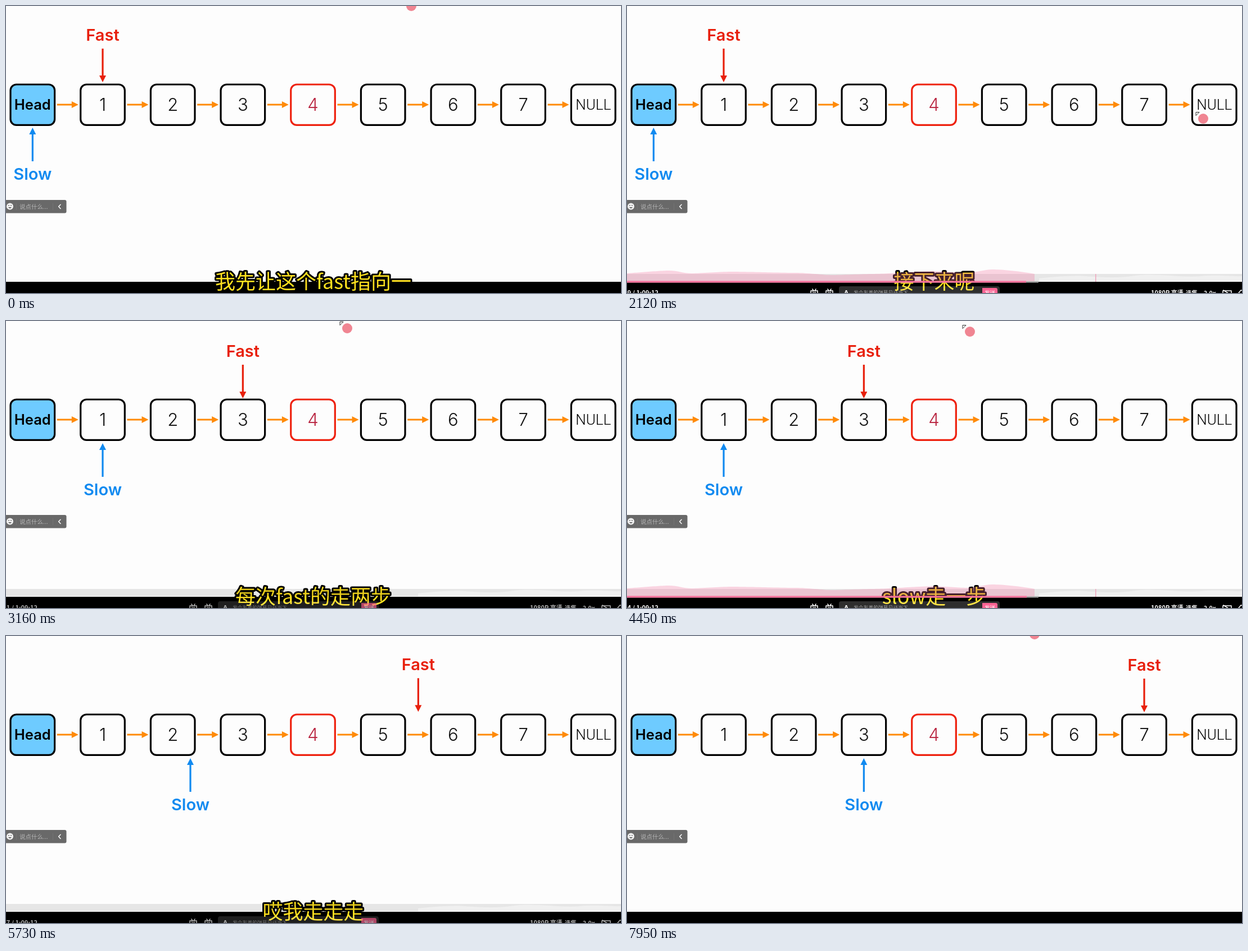
Recreate the animation shown at these times as an HTML page. Size 1094 px wide and 512 px high, loop 7990 ms.

```html
<!DOCTYPE html>
<html lang="zh">
<head>
<meta charset="utf-8">
<style>
  html, body { margin: 0; width: 100%; height: 100%; overflow: hidden; background: #fdfdfd; }
  svg { display: block; width: 100vw; height: 100vh; }
  text { font-family: Inter, "Liberation Sans", sans-serif; }
  .mid { text-anchor: middle; }
  .cjk { font-family: "Noto Sans CJK SC", "Noto Sans CJK", sans-serif; }
  .pointer { font-size: 29px; font-weight: 600; text-anchor: middle; }
  #caption { font-size: 36px; font-weight: 500; fill: #ffe11f; stroke: #000; stroke-width: 6;
    stroke-linejoin: round; paint-order: stroke; text-anchor: middle; }
  .ui { font-size: 11px; font-weight: 700; fill: #fff; }
  .line { fill: none; stroke: #fff; stroke-width: 1.5; stroke-linecap: round; stroke-linejoin: round; }
</style>
</head>
<body>
<svg viewBox="0 0 1094 512" preserveAspectRatio="none">
  <rect width="1094" height="512" fill="#fdfdfd"/>
  <g id="list"></g>

  <g id="fast" fill="#e8200c">
    <text class="pointer" y="62">Fast</text>
    <path d="M-1.6 76h3.2v48H6L0 136-6 124h4.4z"/>
  </g>
  <g id="slow" fill="#118af0">
    <text class="pointer" y="310">Slow</text>
    <path d="M-1.6 277h3.2v-48H6L0 217-6 229h4.4z"/>
  </g>

  <g id="chat">
    <rect x="-6" y="346" width="113.5" height="23.5" rx="3" fill="#696969"/>
    <circle cx="7" cy="357.5" r="6" fill="#f2f2f2"/>
    <path d="M4 359q3 4 6 0z M4.2 355h1.6v1.6H4.2z M8.2 355h1.6v1.6H8.2z" fill="#555"/>
    <path d="M18.5 352v12M83.5 352v12" stroke="#747474"/>
    <text class="cjk" x="24" y="362" font-size="10.5" fill="#b4b4b4">说点什么...</text>
    <path class="line" d="M97 354.2l-3.4 3.6 3.4 3.6"/>
  </g>

  <rect y="492" width="1094" height="20"/>
  <text id="caption" class="cjk" x="546.5" y="505"></text>

  <g id="strip">
    <rect y="478" width="1094" height="13" fill-opacity=".09"/>
    <path d="M733 491V486S780 480 815 482 870 486 905 481 985 485 1020 482 1075 483 1094 482V491z" fill="#fff" fill-opacity=".4"/>
  </g>
  <g id="progress">
    <path d="M0 491V477S60 472 75 472 100 477 115 477 165 474 185 474 280 476 300 476 350 480 365 480 420 478 440 478 530 473 545 473 590 476 605 476 635 470 650 470 700 473 725 478V491z" fill="#f0709c" fill-opacity=".29"/>
    <rect x="833" y="478" width="1.5" height="14" fill="#f0a5bd"/>
    <rect y="491" width="732" height="2.5" fill="#a8a8a8"/>
    <rect id="played" y="490.5" height="3" fill="#fb6f9b"/>
  </g>
  <g id="controls">
    <text id="clock" class="ui cjk" x="56" y="516" text-anchor="end"></text>
    <g id="danmaku"></g>
    <rect x="377" y="500" width="286" height="24" rx="4" fill="#fff" fill-opacity=".18"/>
    <text class="ui mid" x="390" y="515" font-weight="400">A</text>
    <text class="cjk" x="403" y="514.5" font-size="8.8" fill="#a5a5a5">发个友善的弹幕见证当下</text>
    <path d="M632 503h24q3 0 3 3v10h-27z" fill="#fb6494"/>
    <text class="cjk mid" x="645.5" y="514.5" font-size="9.5" fill="#fff">发送</text>
    <text class="ui cjk" x="932" y="516">1080P 高清</text>
    <text class="ui cjk" x="994" y="516" style="font-size:10.5px">选集</text>
    <text class="ui cjk" x="1026" y="516" style="font-size:10.5px">2.0x</text>
    <path class="line" d="M1060 514v-6h15v6M1061 507l14 9M1088 512l4-5 4 1"/>
  </g>

  <g id="cursor">
    <path d="M-13-11.5h6l-6 6z" fill="#fff" stroke="#333"/>
    <circle r="9" fill="#f08592"/>
  </g>
</svg>
<script>
const $ = id => document.getElementById(id);
const LOOP = 7990, STEP = 124.68, FIRST = 47.3;
const nodeX = i => FIRST + STEP * i;

const labels = ['Head', 1, 2, 3, 4, 5, 6, 7, 'NULL'];
$('list').innerHTML = labels.map((label, i) => {
  const x = nodeX(i), head = i === 0, marked = i === 4, last = i === 8;
  const style = head ? 'font-size="25.5" font-weight="600"'
    : last ? 'font-size="26" font-weight="300" style="font-family:Roboto,sans-serif"'
    : `font-size="31" font-weight="300" fill="${marked ? '#b8233f' : '#111'}"`;
  return `<rect x="${x - 39.3}" y="140" width="78.6" height="72.4" rx="10.5" stroke-width="3.2"
      fill="${head ? '#6ecbff' : '#fdfdfd'}" stroke="${marked ? '#ee210e' : '#000'}"/>
    <text class="mid" x="${x}" y="${head || last ? 185 : 187}" ${style}>${label}</text>` +
    (last ? '' : `<path fill="#ff8a08" d="M${x + 43.5} 174.6h26V170l12 6-12 6v-4.4h-26z"/>`);
}).join('');

$('danmaku').innerHTML = [333, 360].map(x =>
  `<path class="line" d="M${x - 6} 514v-6h12v6M${x - 3} 505l1.5 2.5M${x + 3} 505l-1.5 2.5"/>
   <text class="cjk mid" x="${x}" y="516" font-size="8" fill="#fff">弹</text>`).join('');

const captions = [
  [0, '我先让这个fast指向一'], [520, '然后slow这个指向head'], [1880, '接下来呢'],
  [2520, '每次fast的走两步'], [3680, ''], [4450, 'slow走一步'], [5130, '哎我走走走'],
  [6330, ''], [7380, '走到这个位置'], [7950, '']
];

// Each visit of the cursor: points of [time, x, y]; hidden between visits.
const visits = [
  [[0, 721, 0], [520, 721, 0]],
  [[920, 770, -12], [1040, 795, 20], [1360, 795, 20], [1450, 795, -15]],
  [[1800, 960, -10], [2080, 1025, 201], [2200, 1025, 201], [2700, 607, 13],
   [3930, 607, 13], [3990, 610, 19], [4450, 610, 19], [4610, 613, -14]],
  [[7100, 700, -14], [7180, 725, -3], [LOOP, 725, -3]]
];
const shows = [[920, 1400], [1800, 3100], [3930, 5670]];   // player controls: fade in, fade out
const moves = [2150, 4740, 5515], MOVE = 660;

const clamp = v => Math.max(0, Math.min(1, v));
const smooth = v => v * v * (3 - 2 * v);
const lerp = (a, b, k) => a + (b - a) * k;

function along(points, t) {
  const i = Math.max(1, points.findIndex(p => p[0] > t));
  const [a, b] = [points[i - 1], points[i]], k = smooth(clamp((t - a[0]) / (b[0] - a[0])));
  return [lerp(a[1], b[1], k), lerp(a[2], b[2], k)];
}
const place = (id, x, y) => $(id).setAttribute('transform', `translate(${x} ${y})`);
const fade = (id, a) => $(id).setAttribute('opacity', clamp(a));

function draw(t) {
  const k = moves.map(m => smooth(clamp((t - m) / MOVE)));
  const steps = k[0] + k[1] + k[2];
  place('fast', nodeX(1 + 2 * steps), 2 * k[0] - 3 * k[1] + k[2]);
  place('slow', nodeX(steps), k[0]);

  const text = captions.filter(c => c[0] <= t).pop()[1];
  if ($('caption').textContent !== text) $('caption').textContent = text;

  const shown = Math.max(...shows.map(([on, off]) =>
    Math.min(clamp((t - on) / 200), clamp((off + 200 - t) / 200))));
  fade('strip', shown * 1.7);
  fade('progress', (shown - 0.75) * 4);
  fade('controls', shown);
  $('played').setAttribute('width', 710 + (t - 2120) * 0.0005);
  $('clock').textContent = `3:${54 + Math.floor((t - 4290) / 480)} / 1:09:12`;

  const visit = visits.find(v => t >= v[0][0] && t < v[v.length - 1][0]);
  fade('cursor', visit ? 1 : 0);
  if (visit) place('cursor', ...along(visit, t));
}

const start = performance.now();
function tick() {
  draw((performance.now() - start) % LOOP);
  requestAnimationFrame(tick);
}
tick();
</script>
</body>
</html>
```
